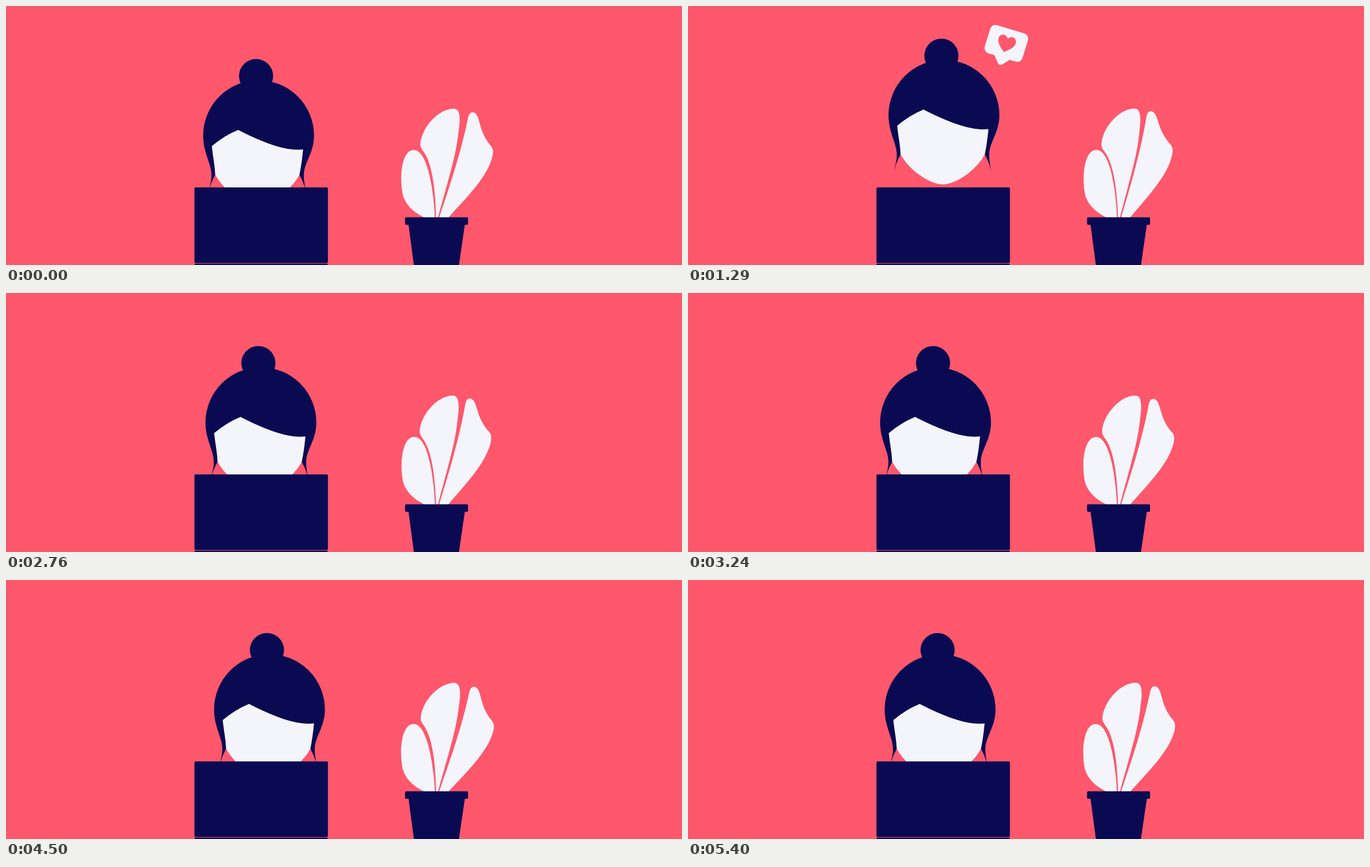
These frames come from a looping animation (1207 px wide and 464 px high, 5.43 s). An HTML page:

```html
<!DOCTYPE html>
<html lang="en">
<head>
<meta charset="utf-8">
<title>Peeking over the laptop</title>
<style>
  html, body { margin: 0; width: 100%; height: 100%; overflow: hidden; background: #ff576c; }
  svg { display: block; width: 100%; height: 100%; }
  .navy { fill: #0a0a52; }
  .white { fill: #f4f4fb; }
  .red { fill: #ff576c; }
</style>
</head>
<body>
<svg viewBox="0 0 1207 464">
  <g id="head">
    <g class="navy">
      <circle cx="446.5" cy="125.5" r="30.5"/>
      <path d="M352 232 A99 99 0 0 1 550 232 C550 261 534.5 278 532 298
        C531 312 534 320 534.5 332 C532.5 316 526.5 309 524 302 L373.5 302
        C371 309 365 316 363 332 C363.5 320 368 312 366.5 298 C365 280 352 261 352 232Z"/>
    </g>
    <path class="white" d="M367.5 251 Q390 232 414.5 222 C450 240 495 261 530.5 257
      C529 272 527 288 524 302 C510 330 472 356 449 356
      C425 356 388 330 373.5 302 C373 285 369 268 367.5 251Z"/>
  </g>

  <g id="bubble">
    <path class="white" d="M-7.5 -21 H7.5 Q11 -21 11 -17.5 V-8 Q11 -4.5 7.5 -4.5 H4.5
      L1.2 -.8 Q0 .4 -1.2 -.8 L-4.5 -4.5 H-7.5 Q-11 -4.5 -11 -8 V-17.5 Q-11 -21 -7.5 -21Z"/>
    <path class="red" d="M0 -7.8 C-3 -10 -5 -12 -5 -14.3 C-5 -17.4 -1.3 -18 0 -15.4
      C1.3 -18 5 -17.4 5 -14.3 C5 -12 3 -10 0 -7.8Z"/>
  </g>

  <g class="navy">
    <rect x="336.5" y="325" width="238.3" height="135.6" rx="2"/>
    <rect x="336.5" y="461.6" width="238" height="8" rx="2"/>
  </g>

  <g class="white">
    <path id="left" d="M749 380 C735 373 716 362 709 340 C702 312 705 258 728 258
      C750 257 763 318 765.8 380Z"/>
    <path id="middle" d="M768 380 C766.5 335 763 291 748.5 265.5 C744 258 739 254 740 246
      C742 220 770 184 800 184 C812 184 811 205 808 225 C804 269 786 323 771 380Z"/>
    <path id="right" d="M773 380 C792 323 811 267 824 205 C826 193 829 190 834 190.5
      C841 192 843 200 846 211 C851 230 857 240 866 251 C871 257 870 263 868 272
      C857 310 820 345 789 380Z"/>
  </g>
  <g class="navy">
    <path d="M718.5 390 H819.5 L808.5 466 H728.5Z"/>
    <rect x="712.5" y="378.5" width="112.5" height="13.5" rx="2"/>
  </g>
</svg>
<script>
  const LOOP = 5430;

  const setTransform = (id, value) =>
    document.getElementById(id).setAttribute("transform", value);

  const progress = (t, from, to) => Math.min(1, Math.max(0, (t - from) / (to - from)));
  const ease = (t, from, to) => (1 - Math.cos(Math.PI * progress(t, from, to))) / 2;

  // Rises past 1 before settling.
  function overshoot(u) {
    const c = 1.7, v = u - 1;
    return 1 + (c + 1) * v ** 3 + c * v ** 2;
  }

  // Glance left, centre, then search left, right, left and back.
  const headX = t =>
    -8 * ease(t, 0, 300) + 14 * ease(t, 340, 800) - 16 * ease(t, 2650, 3155)
    + 30 * (ease(t, 3155, 3890) - ease(t, 4440, 5150)) + 10 * ease(t, 5150, 5460);

  // A small peek, then a full rise, undone in the same two stages.
  const headY = t =>
    -12 * (ease(t, 510, 760) - ease(t, 2370, 2600))
    - 24.5 * (ease(t, 900, 1130) - ease(t, 2000, 2200));

  const bubbleSize = t =>
    3.2 * overshoot(progress(t, 1020, 1260)) * overshoot(1 - progress(t, 1700, 1940));

  const breeze = t => Math.cos(2 * Math.PI * (t - 4550) / LOOP);

  function draw(t) {
    setTransform("head", `translate(${headX(t)} ${headY(t)})`);
    setTransform("bubble", `translate(556.5 106) rotate(17) scale(${bubbleSize(t)})`);
    const lean = breeze(t) - breeze(0);
    setTransform("left", `rotate(${-0.45 * lean} 760 380)`);
    setTransform("middle", `rotate(${0.55 * lean} 770 380)`);
    setTransform("right", `rotate(${1.55 * lean} 776 380)`);
  }

  const start = performance.now();
  function tick(now) {
    draw(Math.max(0, now - start) % LOOP);
    requestAnimationFrame(tick);
  }
  draw(0);
  requestAnimationFrame(tick);
</script>
</body>
</html>
```
